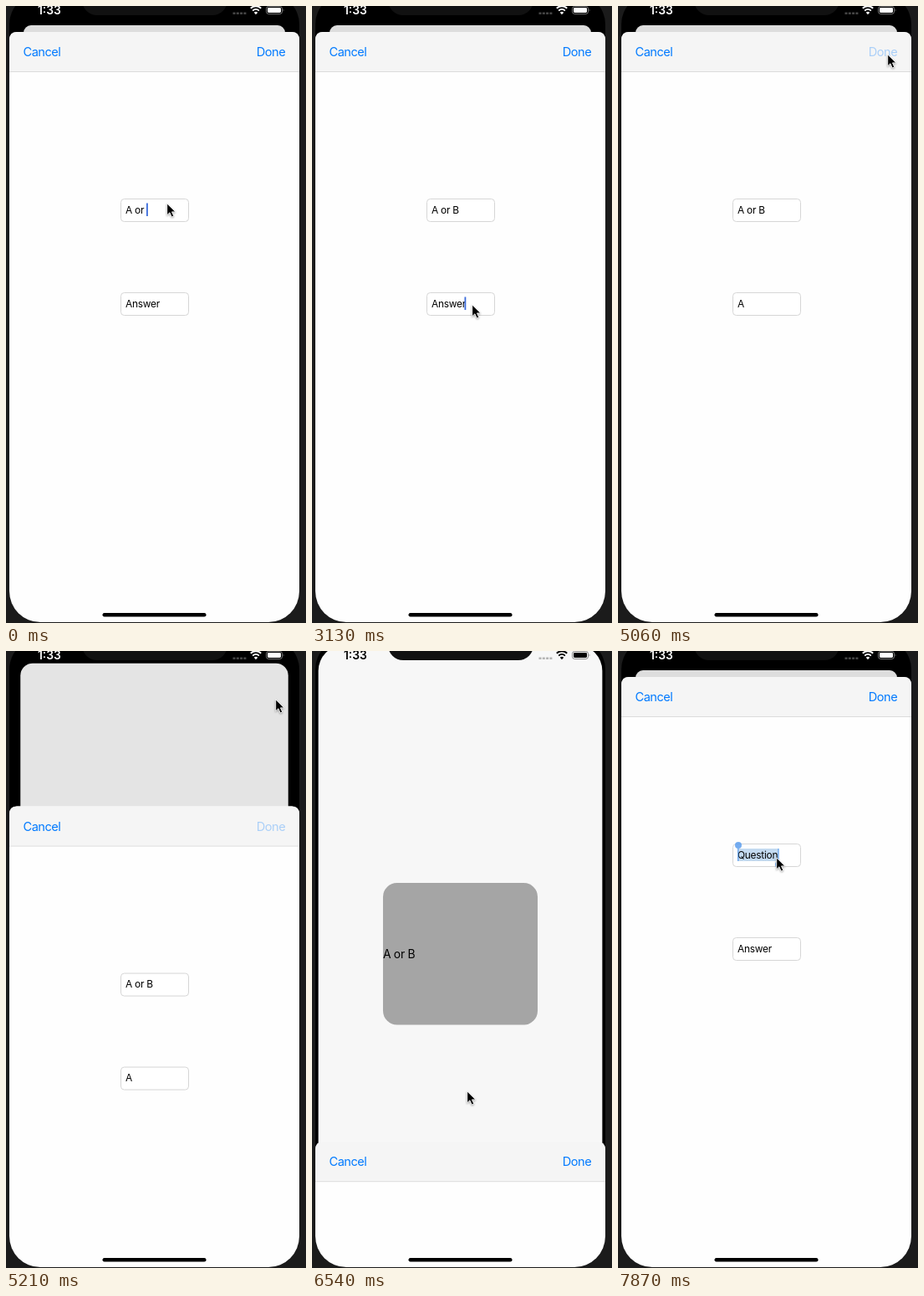
Write an HTML page that moves like this. It is 359 px wide and 737 px high and loops after 8000 ms.

```html
<!DOCTYPE html>
<html lang="en">
<head>
<meta charset="utf-8">
<title>Flash cards</title>
<style>
html, body { margin: 0; width: 100%; height: 100%; overflow: hidden; background: #1b1b1b; }
svg { display: block; width: 359px; height: 737px; }
text { font: 11.9px Inter, "Open Sans", sans-serif; letter-spacing: -.25px; white-space: pre; }
.nav { font-size: 14.6px; letter-spacing: -.5px; fill: #007aff; }
.bar { font-size: 12.5px; letter-spacing: -.35px; fill: #007aff; }
.card { font-size: 14.2px; letter-spacing: -.3px; }
.time { font-size: 13.8px; font-weight: 600; letter-spacing: 0; }
.menu { font-size: 12px; fill: #fff; }
.field { fill: #fff; stroke: #d6d6d6; }
.caret { fill: #3a6bdc; }
#pointer { filter: drop-shadow(0 1px 1px rgba(0, 0, 0, .35)); }
</style>
</head>
<body>
<svg viewBox="0 0 359 737">
  <defs>
    <clipPath id="screen"><rect x="4" y="-15" width="347" height="751" rx="37"/></clipPath>
  </defs>
  <g clip-path="url(#screen)">
    <rect width="359" height="737"/>
    <g id="home">
      <rect id="page" x="4" y="-15" width="347" height="751" fill="#fefefe"/>
      <rect x="83" y="275" width="189" height="173" rx="17" fill="#aaa"/>
      <text class="card" x="83" y="367">A or B</text>
      <text class="bar" x="27.5" y="667" style="fill:#ccc">Prev</text>
      <text class="bar" id="plus" x="177.5" y="667" text-anchor="middle">+</text>
      <text class="bar" x="301.5" y="667">Next</text>
      <rect id="dim" x="4" y="-15" width="347" height="751"/>
    </g>
    <g id="sheet">
      <rect x="4" y="31" width="347" height="760" rx="9" fill="#fefefe"/>
      <path d="M4 78V40q0-9 9-9H342q9 0 9 9V78z" fill="#f5f5f5"/>
      <path d="M4 78.5H351" stroke="#dcdcdc"/>
      <text class="nav" x="20.5" y="60">Cancel</text>
      <text class="nav" id="done" x="299.8" y="60">Done</text>
      <g id="fields"></g>
      <g id="menu">
        <path d="M18 303.5H336q6 0 6 6V327q0 6-6 6H171l-8 8-8-8H18q-6 0-6-6V309.5q0-6 6-6z" fill="#1c1c1c"/>
        <g id="items"></g>
      </g>
    </g>
    <g id="status">
      <text class="time" x="38" y="10" style="fill:inherit">1:33</text>
      <path d="M271.5 8.7h16" stroke="currentColor" stroke-width="2.6" stroke-dasharray="3 1.3" opacity=".27"/>
      <path d="M292.8 2.8a9 9 0 0 1 12.4 0M295.2 5.6a5.5 5.5 0 0 1 7.6 0" fill="none" stroke="currentColor" stroke-width="2"/>
      <path d="M299 10.2l-2.2-2.4a3.2 3.2 0 0 1 4.4 0z"/>
      <rect x="311.5" y=".5" width="19" height="9" rx="2.8" fill="none" stroke="currentColor" opacity=".45"/>
      <rect x="313" y="2" width="16" height="6" rx="1.4"/>
      <path d="M331.7 3.3q1.6 1.7 0 3.4z" opacity=".5"/>
    </g>
    <path d="M91-20V-7a18 18 0 0 0 18 18H247a18 18 0 0 0 18-18V-20z" fill="#111"/>
    <rect x="115.5" y="725" width="124" height="4.4" rx="2.2"/>
  </g>
  <path id="pointer" d="M.7.9V14.8l3.2-3 2.3 5.2 2.6-1.1-2.3-5h4.3z" stroke="#fff" stroke-width=".9"/>
</svg>
<script>
const $ = id => document.getElementById(id);
const LOOP = 8000, STEP = 148.8;

// Pointer path: step, x, y
const path = [
  [0, 192, 235], [5, 192, 235], [6, 192, 241], [7, 193, 270], [8, 193, 299], [9, 193, 309],
  [17, 193, 309], [19, 192, 338], [20, 190, 354], [21, 191, 356], [25, 191, 356],
  [26, 196, 340], [27, 245, 230], [28, 322, 100], [29, 346, 64], [30, 322, 57],
  [35, 322, 57], [37, 262, 360], [38, 212, 580], [39, 198, 642], [41, 177, 660],
  [43, 177, 660], [45, 193, 390], [46, 196, 299], [47, 196, 299], [49, 194, 270],
  [51, 189, 246], [53, 189, 246]
];

// Field contents: step, text, caret x (0 hides it)
const contents = [
  [[0, "A or ", 168], [3, "A or B", 175.2], [6, "A or B", 0], [9, "A or B", 175.2],
   [12, "A or BB", 183], [13, "A or ", 168], [14, "A or B", 175.2], [18, "A or B", 0],
   [38, "Question", 0], [51, "Question", 191.5], [52, "Question", 0]],
  [[0, "Answer", 0], [21, "Answer", 182.5], [22, "Answer", 0], [25, "A", 150.3],
   [28, "A", 0], [32, "A", 150.3], [34, "A", 0], [38, "Answer", 0]]
];

function fieldMarkup(y, end) {
  return `<rect class="field" x="137.5" y="${y + .5}" width="81" height="27" rx="4"/>
    <rect class="mark" x="143" y="${y + 6}" width="${end - 143}" height="15" fill="#c3daf0"/>
    <text x="143" y="${y + 17.8}"></text>
    <rect class="caret" y="${y + 5.5}" width="1.8" height="15.5"/>
    <g class="grips" fill="#5c9eee">
      <rect x="143" y="${y + 4}" width="1.4" height="17"/>
      <rect x="${end - .7}" y="${y + 6}" width="1.4" height="17"/>
      <circle cx="144" cy="${y + 2}" r="4"/><circle cx="${end}" cy="${y + 25}" r="4"/>
    </g>`;
}

$("fields").innerHTML = `<g>${fieldMarkup(230, 192)}</g><g>${fieldMarkup(342, 183)}</g>`;
$("items").innerHTML = [["Cut", 26.5], ["Copy", 74.5], ["Replace…", 131.5], ["Look Up", 212.5], ["Share…", 286.5]]
  .map(([label, x]) => `<text class="menu" x="${x}" y="323">${label}</text>`).join("");

// Critically damped spring from 0 to 1
function spring(ms) {
  const s = Math.max(0, ms) * .01826;
  return 1 - (1 + s) * Math.exp(-s);
}

function pointerAt(k) {
  const i = Math.max(1, path.findIndex(p => p[0] >= k));
  const [a, b] = [path[i - 1], path[i]];
  const u = (k - a[0]) / (b[0] - a[0]);
  return [a[1] + (b[1] - a[1]) * u, a[2] + (b[2] - a[2]) * u];
}

function drawField(i, k, mark, grips) {
  const [, text, caret] = contents[i].filter(c => c[0] <= k).pop();
  const g = $("fields").children[i], part = s => g.querySelector(s);
  part("text").textContent = text;
  part(".caret").setAttribute("x", caret);
  part(".caret").style.opacity = caret ? 1 : 0;
  part(".mark").style.opacity = mark;
  part(".grips").style.opacity = grips;
}

function draw(t) {
  const k = Math.min(53, Math.floor((t + 20) / STEP)), now = k * STEP;
  const open = 1 - spring(now - 5160) + spring(now - 6500);

  $("sheet").setAttribute("transform", `translate(0 ${706 * (1 - open)})`);
  $("home").setAttribute("transform",
    `translate(177.5 ${38 * open - 15}) scale(${1 - .098 * open}) translate(-177.5 15)`);
  const radius = 37 - 27 * open;
  $("page").setAttribute("rx", radius);
  $("dim").setAttribute("rx", radius);
  $("dim").style.opacity = .13 * open;
  const ink = open > .5 ? "#fff" : "#000";
  $("status").style.fill = $("status").style.color = ink;

  drawField(0, k, +(k >= 52), k >= 52 ? .85 : 0);
  drawField(1, k, +(k >= 22 && k < 25), k < 22 ? 0 : k < 25 ? .85 : k == 25 ? .22 : 0);

  const menu = { 23: .5, 24: 1, 25: .56 }[k] || 0;
  $("menu").style.opacity = $("items").style.opacity = menu;
  $("done").style.opacity = k >= 33 && k <= 35 ? .3 : 1;
  $("plus").style.opacity = k == 42 || k == 43 ? .3 : 1;
  $("pointer").setAttribute("transform", `translate(${pointerAt(k)})`);
}

function frame() {
  draw(performance.now() % LOOP);
  requestAnimationFrame(frame);
}
frame();
</script>
</body>
</html>
```
